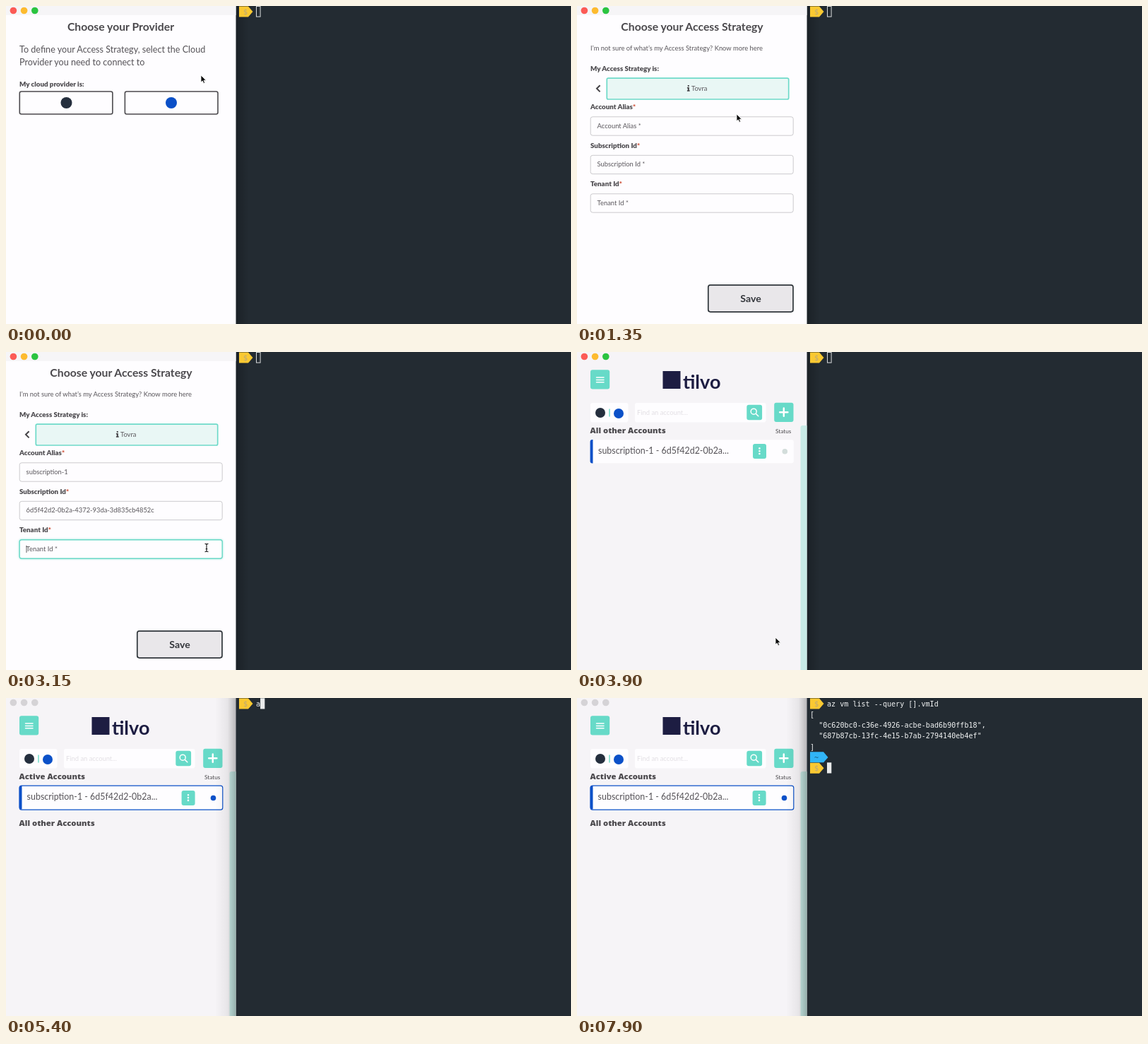
Animation of 800 by 450 pixels, one loop 7950 ms. Source, as an HTML page:

```html
<!DOCTYPE html>
<html lang="en">
<head>
<meta charset="utf-8">
<title>Cloud access setup</title>
<style>
  html, body { margin: 0; width: 100%; height: 100%; overflow: hidden; background: #232b32; }
  svg { display: block; width: 800px; height: 450px; }
  text { font-family: Lato, sans-serif; fill: #4b494d; white-space: pre; }
  .title { font-size: 15.75px; font-weight: 700; text-anchor: middle; }
  .body { font-size: 12.6px; fill: #565358; }
  .row { font-size: 12.45px; }
  .small { font-size: 9.4px; fill: #59565b; }
  .label { font-size: 9.75px; font-weight: 900; }
  .label tspan { fill: #cf5038; }
  .head { font: 800 11.25px "Open Sans", sans-serif; }
  .status { font-size: 8.2px; }
  .hint { fill: #e2dfe4; }
  .save { font-size: 14.1px; font-weight: 700; fill: #33363b; text-anchor: middle; }
  .word { font-size: 27px; font-weight: 700; fill: #1d1d42; }
  .mono { font: 10.08px "DejaVu Sans Mono", monospace; fill: #f1f3f3; }
  .mark { fill: #b9a77c; }
  .path { fill: #1d5f80; }
  .teal { fill: #67dac8; }
  .white { fill: #fefdff; }
  .dark { fill: #252f3e; }
  .blue { fill: #0b50c8; }
  .line { fill: none; stroke: #fff; stroke-width: 1.5; stroke-linecap: round; }
  .outline { fill: #fefdff; stroke: #4c4a4e; stroke-width: 1.6; }
  .field { fill: #fefdff; stroke: #cbcacd; }
  .field.on { stroke: #69d8c6; stroke-width: 1.4; filter: drop-shadow(0 0 1.5px #9feadd); }
</style>
</head>
<body>
<svg viewBox="0 0 800 450">
  <defs>
    <linearGradient id="right"><stop stop-opacity=".22"/><stop offset="1" stop-opacity="0"/></linearGradient>
    <linearGradient id="left"><stop stop-opacity="0"/><stop offset=".6" stop-opacity=".06"/><stop offset="1" stop-opacity=".25"/></linearGradient>
    <g id="dollar">
      <path d="M330 .5H343L349.5 8 343 15.6H330Z" fill="#fac932"/>
      <text class="mono mark" x="336" y="11.7">$</text>
    </g>
  </defs>

  <rect width="800" height="450" fill="#232b32"/>
  <rect id="shadeRight" x="326" width="18" height="450" fill="url(#right)"/>

  <g>
    <use href="#dollar"/>
    <text class="mono" id="command" x="354" y="11.7"></text>
    <g id="output">
      <text class="mono" x="330" y="26.9">[</text>
      <text class="mono" x="330" y="42.1">  "0c620bc0-c36e-4926-acbe-bad6b90ffb18",</text>
      <text class="mono" x="330" y="57.3">  "687b87cb-13fc-4e15-b7ab-2794140eb4ef"</text>
      <text class="mono" x="330" y="72.5">]</text>
    </g>
    <g id="prompt">
      <path d="M330 76.3H349L355.5 84 349 91.3H330Z" fill="#31b5f7"/>
      <text class="mono path" x="336" y="87.7">~</text>
      <use href="#dollar" y="91.2"/>
    </g>
    <rect id="block" width="6.3" height="15.2" fill="#e9ebeb"/>
    <rect id="hollow" x="354.5" y=".5" width="5.6" height="14.6" fill="none" stroke="#d9dcdd"/>
  </g>

  <g id="setup">
    <rect class="white" width="325.5" height="450"/>
    <rect width="325.5" height="13" fill="#f6f5f7"/>
    <g id="provider">
      <text class="title" x="162.5" y="35">Choose your Provider</text>
      <text class="body" x="19" y="66">To define your Access Strategy, select the Cloud</text>
      <text class="body" x="19" y="84">Provider you need to connect to</text>
      <text class="label" x="19" y="114.2">My cloud provider is:</text>
      <rect class="outline" x="19.3" y="121" width="131.6" height="32" rx="2.5"/>
      <rect class="outline" x="168.4" y="121" width="131.6" height="32" rx="2.5"/>
      <circle class="dark" cx="85.5" cy="137" r="8"/>
      <circle class="blue" cx="234" cy="137" r="8"/>
    </g>
    <g id="strategy">
      <text class="title" x="163" y="35">Choose your Access Strategy</text>
      <text class="small" x="19" y="62.6">I’m not sure of what’s my Access Strategy? Know more here</text>
      <text class="label" x="19" y="91.6">My Access Strategy is:</text>
      <path d="M32.6 112.2 28 116.8 32.6 121.4" fill="none" stroke="#444246" stroke-width="2"/>
      <rect x="42.3" y="102.2" width="257.4" height="29.8" rx="2" fill="#e9f7f5" stroke="#6edac9" stroke-width="1.7"/>
      <path d="M156.8 112h1.9v2h-1.9ZM155.9 115h2.9v4.3h.9v1.5h-3.8v-1.5h.9v-2.8h-.9Z" fill="#444246"/>
      <text class="small" x="162" y="119.6">Tovra</text>
      <g id="fields"></g>
      <rect x="185.8" y="394.8" width="120.2" height="38" rx="3" fill="#e9e7ea" stroke="#30363b" stroke-width="1.7"/>
      <text class="save" x="246" y="419.2">Save</text>
    </g>
  </g>

  <g id="accounts">
    <rect width="325.5" height="450" fill="#f6f4f7"/>
    <rect class="teal" x="19" y="25.3" width="27.2" height="27.2" rx="3"/>
    <path class="line" d="M27.5 36h10.5M27.5 39.4h10.5M27.5 42.8h10.5"/>
    <rect x="121.5" y="27" width="25" height="25" fill="#1d1d42"/>
    <text class="word" x="150" y="52">tilvo</text>
    <rect class="white" x="19" y="72" width="53.5" height="27.5" rx="3"/>
    <circle class="dark" cx="33" cy="86" r="7"/>
    <path d="M46 80.5V91.5" stroke="#67dac8" stroke-width="1.4"/>
    <circle class="blue" cx="59" cy="87" r="7"/>
    <rect class="white" x="82" y="72" width="185.5" height="27.5" rx="3"/>
    <text class="small hint" x="85" y="89.2">Find an account...</text>
    <rect class="teal" x="240.3" y="74.8" width="21.8" height="21.4" rx="3"/>
    <circle class="line" cx="250.2" cy="84.2" r="4"/>
    <path class="line" d="M253.3 87.4 256.8 90.8"/>
    <rect class="teal" x="279.2" y="71.8" width="27.3" height="27.3" rx="3"/>
    <path class="line" d="M287.2 85.2h11.2M292.8 79.6v11.2" style="stroke-width:2.5"/>
    <path d="M316.5 450V107q0-3 3-3h6V450Z" fill="#c9ebe7"/>
    <text class="head" id="heading" x="18.6" y="115.4"></text>
    <text class="status" x="281" y="115.2">Status</text>
    <rect class="white" id="row" x="19.2" y="124.2" width="287.6" height="33" rx="3" stroke-width="1.2"/>
    <path class="blue" d="M22.5 124V157.4H21.6q-3 0-3-3V127q0-3 3-3Z"/>
    <g id="rowBody">
      <text class="body row" x="30" y="143.6">subscription-1 - 6d5f42d2-0b2a...</text>
      <rect class="teal" x="249" y="130" width="19" height="21" rx="3"/>
      <path d="M258.4 136.4h.01M258.4 140.2h.01M258.4 144h.01" class="line" style="stroke-width:2.6"/>
    </g>
    <circle id="dot" r="3.8"/>
    <text class="head" id="others" x="18.6" y="181">All other Accounts</text>
  </g>

  <rect id="shadeLeft" x="296" width="29.5" height="450" fill="url(#left)"/>
  <g id="lights">
    <circle cx="10.4" cy="6.5" r="4.8"/><circle cx="25.6" cy="6.5" r="4.8"/><circle cx="40.8" cy="6.5" r="4.8"/>
  </g>
  <g id="pointer">
    <path id="arrow" d="M0 0V10l2.3-2.1 1.5 3.5 1.8-.8L4.1 7.2H7.3Z" fill="#0c0c0c" stroke="#fff" stroke-width=".8"/>
    <path id="beam" d="M-2.4-5.6Q0-5.6 0-4.2Q0-5.6 2.4-5.6M0-4.2V4.2M-2.4 5.6Q0 5.6 0 4.2Q0 5.6 2.4 5.6M-1.2 1.6H1.2" fill="none" stroke="#1c1c1c" stroke-width="1.1"/>
  </g>
</svg>
<script>
const LOOP = 7950, STEP = 50;
const FORM = 650, SAVED = 3900, ACTIVE = 5000, TERMINAL = 5350, OUTPUT = 7700, PROMPT = 7750;
const CHAR = 6.07;
const COMMAND = 'az vm list --query [].vmId';
const FIRST_KEYS = [5400, 5650, 5950, 6300, 6450, 6600, 6800, 6950];
const PATH = [
  [0, 276, 98], [500, 234, 136], [900, 234, 136], [1350, 226, 153], [1500, 223, 168],
  [2250, 223, 168], [2430, 270, 223], [2850, 270, 223], [3050, 284, 277],
  [3700, 284, 277], [3850, 281, 404], [4500, 281, 404], [4900, 225, 139]
];
const FIELDS = [
  { name: 'Account Alias', value: 'subscription-1', from: 1650, to: 2200, focus: 1550, blur: 2400 },
  { name: 'Subscription Id', value: '6d5f42d2-0b2a-4372-93da-3d835cb4852c', from: 2500, to: 2500, focus: 2400, blur: 3050 },
  { name: 'Tenant Id', value: 'b41f7c06-52ae-4d19-8c3e-90a7d265e1f8', from: 3500, to: 3500, focus: 3050, blur: SAVED }
];

const $ = id => document.getElementById(id);
const show = (id, on) => { $(id).style.display = on ? '' : 'none'; };
const set = (node, attrs) => { for (const k in attrs) node.setAttribute(k, attrs[k]); };

$('fields').innerHTML = FIELDS.map((f, i) => `
  <g transform="translate(0 ${i * 54.5})">
    <text class="label" x="19" y="146">${f.name}<tspan>*</tspan></text>
    <rect class="field" x="19.2" y="156.8" width="287" height="26.4" rx="3"/>
    <text class="small value" x="28.6" y="172.7"></text>
    <path class="caret" d="M0 164.8V175" stroke="#333" stroke-width=".8"/>
  </g>`).join('');
const groups = [...$('fields').children];

function drawField(f, group, t) {
  const box = group.querySelector('.field');
  const text = group.querySelector('.value');
  const caret = group.querySelector('.caret');
  const on = t >= f.focus && t < f.blur;
  const share = f.to > f.from ? Math.min(1, (t - f.from) / (f.to - f.from)) : 1;
  const typed = t < f.from ? '' : f.value.slice(0, Math.max(1, Math.round(share * f.value.length)));
  box.classList.toggle('on', on);
  text.textContent = typed || f.name + ' *';
  caret.style.display = on ? '' : 'none';
  if (on) set(caret, { transform: `translate(${29 + (typed ? text.getComputedTextLength() : 0)} 0)` });
}

function pointerAt(t) {
  const i = PATH.findIndex(p => p[0] > t);
  if (i < 0) return PATH[PATH.length - 1].slice(1);
  const [t0, x0, y0] = PATH[i - 1], [t1, x1, y1] = PATH[i];
  const u = (t - t0) / (t1 - t0), e = u * u * (3 - 2 * u);
  return [x0 + (x1 - x0) * e, y0 + (y1 - y0) * e];
}

function keysAt(t) {
  const last = FIRST_KEYS[FIRST_KEYS.length - 1];
  if (t < last) return FIRST_KEYS.filter(k => k <= t).length;
  return Math.min(COMMAND.length, FIRST_KEYS.length + Math.floor((t - last) / 36));
}

function draw(t) {
  const active = t >= ACTIVE, terminal = t >= TERMINAL, saved = t >= SAVED;
  show('setup', !saved);
  show('provider', t < FORM);
  show('strategy', t >= FORM);
  show('accounts', saved);
  if (t >= FORM && !saved) FIELDS.forEach((f, i) => drawField(f, groups[i], t));

  $('heading').textContent = active ? 'Active Accounts' : 'All other Accounts';
  show('others', active);
  set($('row'), { stroke: active ? '#0b50c8' : 'none', height: active ? 34 : 33 });
  set($('rowBody'), { transform: active ? 'translate(-.4 .9)' : '' });
  set($('dot'), { cx: active ? 293.5 : 294.3, cy: active ? 141.5 : 140.8, fill: active ? '#0b50c8' : '#d3dddb' });

  show('shadeRight', !terminal);
  show('shadeLeft', terminal);
  const colors = terminal ? ['#d5d3d6', '#d5d3d6', '#d5d3d6'] : ['#fc5b56', '#fdbb2f', '#2bc440'];
  [...$('lights').children].forEach((c, i) => set(c, { fill: colors[i] }));

  const [x, y] = pointerAt(t);
  const beam = t >= 1450 && t < 3750;
  set($('pointer'), { transform: `translate(${x} ${y})` });
  show('pointer', !terminal);
  show('arrow', !beam);
  show('beam', beam);

  const keys = keysAt(t), prompt = t >= PROMPT;
  $('command').textContent = COMMAND.slice(0, keys);
  show('hollow', !terminal);
  show('block', terminal);
  set($('block'), { x: 354 + (prompt ? 0 : keys * CHAR), y: prompt ? 91.3 : .3 });
  show('output', t >= OUTPUT);
  show('prompt', prompt);
}

const start = performance.now();
function tick() {
  const t = Math.max(0, performance.now() - start) % LOOP;
  draw(Math.floor(t / STEP) * STEP);
  requestAnimationFrame(tick);
}
tick();
</script>
</body>
</html>
```
